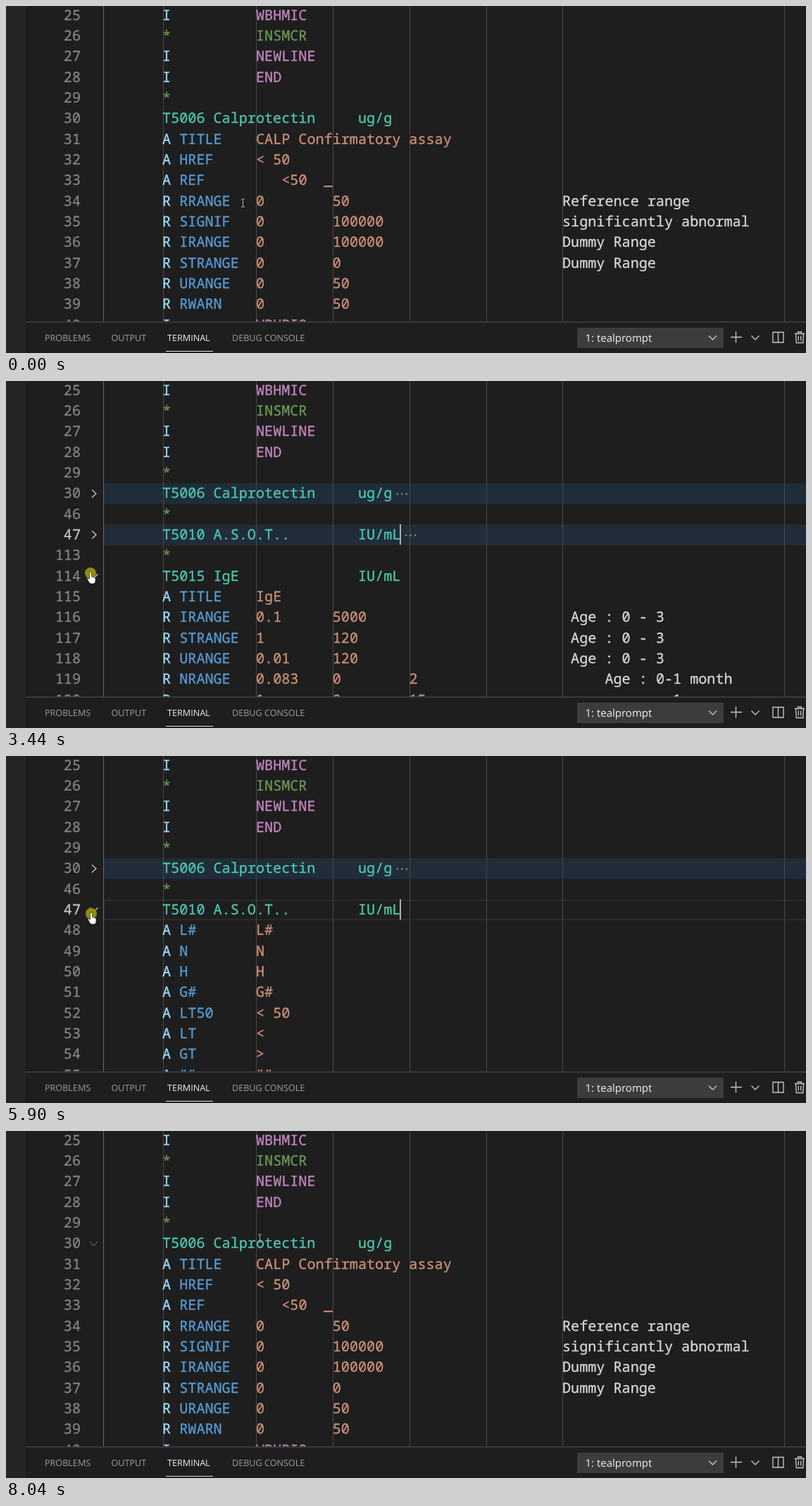
These frames come from a looping animation (1136x493 px, 8.11 s). An HTML page:

```html
<!DOCTYPE html>
<html lang="en">
<head>
<meta charset="utf-8">
<title>Code folding</title>
<style>
  html, body { margin: 0; width: 100%; height: 100%; overflow: hidden; background: #1e1e1e; }
  svg { display: block; width: 1136px; height: 493px; }
  text { white-space: pre; text-rendering: geometricPrecision; fill: currentColor; }
  #code text { font: 20.14px "Noto Sans Mono", monospace; stroke: currentColor; stroke-width: .3; }
  #panel text { font: 12.6px "Open Sans", sans-serif; color: #9d9d9d; }
  #panel .on { color: #eee; }
  #panel .pick { font-size: 15px; color: #f0f0f0; }
  .icon, .chev { fill: none; stroke: #c5c5c5; stroke-width: 1.35; }
  .type { color: #9cdcfe; } .name { color: #569cd6; } .str { color: #ce9178; }
  .call { color: #c586c0; } .rem { color: #6a9955; } .test { color: #4ec9b0; }
  .note { color: #d8d8d8; } .num { color: #858585; text-anchor: end; } .num.on { color: #c6c6c6; }
</style>
</head>
<body>
<svg viewBox="0 0 1136 493">
  <defs><clipPath id="view"><rect width="1136" height="448.5"/></clipPath></defs>
  <rect width="1136" height="493" fill="#1e1e1e"/>
  <rect width="28" height="493" fill="#252526"/>
  <g id="code" clip-path="url(#view)">
    <g id="bands"></g>
    <g id="rulers"></g>
    <g id="rows"></g>
    <rect id="caret" x="559" y="203.5" width="2" height="29" fill="#aeafad"/>
  </g>
  <g id="panel">
    <rect x="28" y="448.3" width="1108" height="1.3" fill="#464646"/>
    <text x="55" y="476">PROBLEMS</text>
    <text x="149.5" y="476">OUTPUT</text>
    <text x="229" y="476" class="on">TERMINAL</text>
    <text x="321" y="476">DEBUG CONSOLE</text>
    <rect x="227" y="490" width="67" height="1" fill="#e7e7e7"/>
    <rect x="811" y="457" width="208" height="29" fill="#3c3c3c"/>
    <text x="822.5" y="477" class="pick">1: tealprompt</text>
    <g class="icon">
      <path d="M998 468.5l5.5 5.5 5.5-5.5M1029 470.5h16M1036.5 462.5v16M1058.5 468.5l5.5 5.5 5.5-5.5"/>
      <path d="M1089 463.5h15v14.5h-15zM1096.5 463.5v14.5"/>
      <path d="M1120 465.5h14M1124.5 465.5v-2.5h5v2.5M1121.5 465.5l.7 13h9.6l.7-13M1125.3 468.5v7M1128.7 468.5v7"/>
    </g>
  </g>
  <g id="mouse">
    <circle id="press" r="8" fill="#918b0d"/>
    <path id="hand" fill="#fff" stroke="#222" stroke-width=".7"
      d="M-1.5 0Q-1.5-2 0-2T1.5 0V5L5 5.8Q7 6.3 7 8.3V11Q7 15 3.5 15H1Q-1 15-2 13L-4.5 8.5Q-4.8 6.7-3 7.2L-1.5 8.4Z"/>
    <path id="beam" fill="none" stroke="#b0b0b0" d="M-2.5-5.5h2l.5.5.5-.5h2M0-5V5M-2.5 5.5h2l.5-.5.5.5h2"/>
  </g>
</svg>
<script>
const $ = id => document.getElementById(id);
const LOOP = 8110, LEFT = 137.5, CHAR = 12.084, TOP = -1.4, ROW = 29.333;
const ACTIVE = 47, HEADS = [30, 47, 114, 144];

// Each line: class, column and text of its tokens
const lines = {};
const put = (n, ...tokens) => { lines[n] = tokens; };
const call = (n, name) => put(n, ['type', 7, 'I'], ['call', 18, name]);
const rem = (n, name = '') => put(n, ['rem', 7, '*'], ['rem', 18, name]);
const test = (n, name, unit = '') => put(n, ['test', 7, name], ['test', 30, unit]);
const text = (n, type, name, value, col = 18) =>
  put(n, ['type', 7, type], ['name', 9, name], ['str', col, value]);
const range = (n, name, a, b, note = '', col = 54, c = '') =>
  put(n, ['type', 7, 'R'], ['name', 9, name], ['str', 18, a], ['str', 27, b], ['str', 36, c], ['note', col, note]);

call(25, 'WBHMIC'); rem(26, 'INSMCR'); call(27, 'NEWLINE'); call(28, 'END'); rem(29);
test(30, 'T5006 Calprotectin', 'ug/g');
text(31, 'A', 'TITLE', 'CALP Confirmatory assay');
text(32, 'A', 'HREF', '< 50');
text(33, 'A', 'REF', '<50  _', 21);
range(34, 'RRANGE', '0', '50', 'Reference range');
range(35, 'SIGNIF', '0', '100000', 'significantly abnormal');
range(36, 'IRANGE', '0', '100000', 'Dummy Range');
range(37, 'STRANGE', '0', '0', 'Dummy Range');
range(38, 'URANGE', '0', '50');
range(39, 'RWARN', '0', '50');
call(40, 'WBHBIO');
rem(46);
test(47, 'T5010 A.S.O.T..', 'IU/mL');
['L#', 'N', 'H', 'G#'].forEach((s, i) => text(48 + i, 'A', s, s));
text(52, 'A', 'LT50', '< 50');
text(53, 'A', 'LT', '<');
text(54, 'A', 'GT', '>');
text(55, 'A', '""', '""');
rem(113);
test(114, 'T5015 IgE', 'IU/mL');
text(115, 'A', 'TITLE', 'IgE');
range(116, 'IRANGE', '0.1', '5000', 'Age : 0 - 3', 55);
range(117, 'STRANGE', '1', '120', 'Age : 0 - 3', 55);
range(118, 'URANGE', '0.01', '120', 'Age : 0 - 3', 55);
range(119, 'NRANGE', '0.083', '0', 'Age : 0-1 month', 59, '2');
range(120, '', '1', '0', ': 1', 65, '15');
rem(143);
test(144, 'T5020 C-REACTIVE PROT');
text(145, 'M', 'MASK', 'CRP', 20);
text(146, 'M', 'COM1', 'This result indicates active inflammation.');
text(147, 'A', 'WEAK', 'Weak Positive');
rem(148, 'INSMCR');

const next = { 30: 46, 47: 113, 114: 143 };
// Time and line of each fold toggle
const toggles = [[1410, 30], [2570, 47], [3570, 114], [5160, 47], [5970, 47], [6500, 114], [7040, 47], [7630, 30]];
// Button held: from, to
const presses = [[1350, 1480], [2440, 2570], [3440, 3570], [5090, 5160], [5900, 5970], [6430, 6500], [6970, 7040], [7570, 7630]];
// Pointer moves: start, steps, target
const moves = [[270, 13, 129, 163], [1140, 2, 127, 164], [1890, 8, 126, 214], [2840, 6, 120, 273], [4760, 5, 121, 224],
  [6040, 6, 127, 272], [6640, 5, 124, 222], [7100, 6, 126, 164], [7770, 5, 360.5, 152.5]];

const clamp = v => Math.min(1, Math.max(0, v));
const colX = c => LEFT + c * CHAR;
const esc = s => s.replace(/</g, '&lt;').replace(/>/g, '&gt;');

function ellipsis(n, mid) {
  const [, col, unit] = lines[n][1], end = colX(col + unit.length);
  return [7.5, 14, 20.5].map(d => `<circle cx="${end + d}" cy="${mid + .5}" r="1.3" fill="#858585"/>`).join('');
}

function drawRows(folded) {
  let bands = '', rows = '';
  for (let i = 0, n = 25; i < 16; i++) {
    const y = TOP + i * ROW, mid = y + ROW / 2, base = Math.round(y + 21);
    const shut = folded.has(n);
    if (shut) bands += `<rect x="139" y="${y}" width="997" height="${ROW}" fill="#202d39"/>`;
    if (n === ACTIVE) bands += `<rect x="139" y="${y + 1}" width="1010" height="${ROW - 2}" fill="none" stroke="#2b2b2b" stroke-width="2"/>`;
    rows += `<text class="num${n === ACTIVE ? ' on' : ''}" x="106" y="${base}">${n}</text>`;
    for (const [cls, col, s] of lines[n] || [])
      if (s) rows += `<text class="${cls}" x="${colX(col)}" y="${base}">${esc(s)}</text>`;
    if (shut) rows += `<path class="chev" d="M122 ${mid - 5.5}l6 5.5-6 5.5"/>` + ellipsis(n, mid);
    else if (HEADS.includes(n)) rows += `<path class="chev open" d="M118.5 ${mid - 3}l6 6 6-6"/>`;
    n = shut ? next[n] : n + 1;
  }
  $('bands').innerHTML = bands;
  $('rows').innerHTML = rows;
}

function pointer(t) {
  let x = 336.5, y = 280;
  for (const [start, steps, tx, ty] of moves) {
    if (t < start) break;
    const p = clamp((Math.floor((t - start) / 66.7) + 1) / steps), e = p * p * (3 - 2 * p);
    x += (tx - x) * e;
    y += (ty - y) * e;
  }
  return [x, y];
}

const show = (id, on) => $(id).setAttribute('visibility', on ? 'visible' : 'hidden');

let drawn = null;
function frame(now) {
  const t = now % LOOP;
  const folded = new Set();
  for (const [at, n] of toggles)
    if (t >= at && !folded.delete(n)) folded.add(n);
  const key = [...folded].sort().join();
  if (key !== drawn) { drawRows(folded); drawn = key; }

  const hover = clamp((t - 870) / 340) * (1 - clamp((t - 7770) / 400));
  document.querySelectorAll('.open').forEach(c => c.setAttribute('opacity', hover));

  const blink = t % 1000;
  show('caret', folded.has(30) && blink >= 430 && blink < 965);

  const [x, y] = pointer(t);
  $('mouse').setAttribute('transform', `translate(${x} ${y})`);
  show('press', presses.some(([a, b]) => t >= a && t < b));
  show('hand', x < 138);
  show('beam', x >= 138);
  requestAnimationFrame(() => frame(performance.now() - begin));
}

$('rulers').innerHTML = [138, 223, 355, 464, 573, 682, 790, 1105].map((x, i) =>
  `<rect x="${x}" y="0" width="1" height="449" fill="${i ? '#484848' : '#686868'}"/>`).join('');
const begin = performance.now();
frame(0);
</script>
</body>
</html>
```
